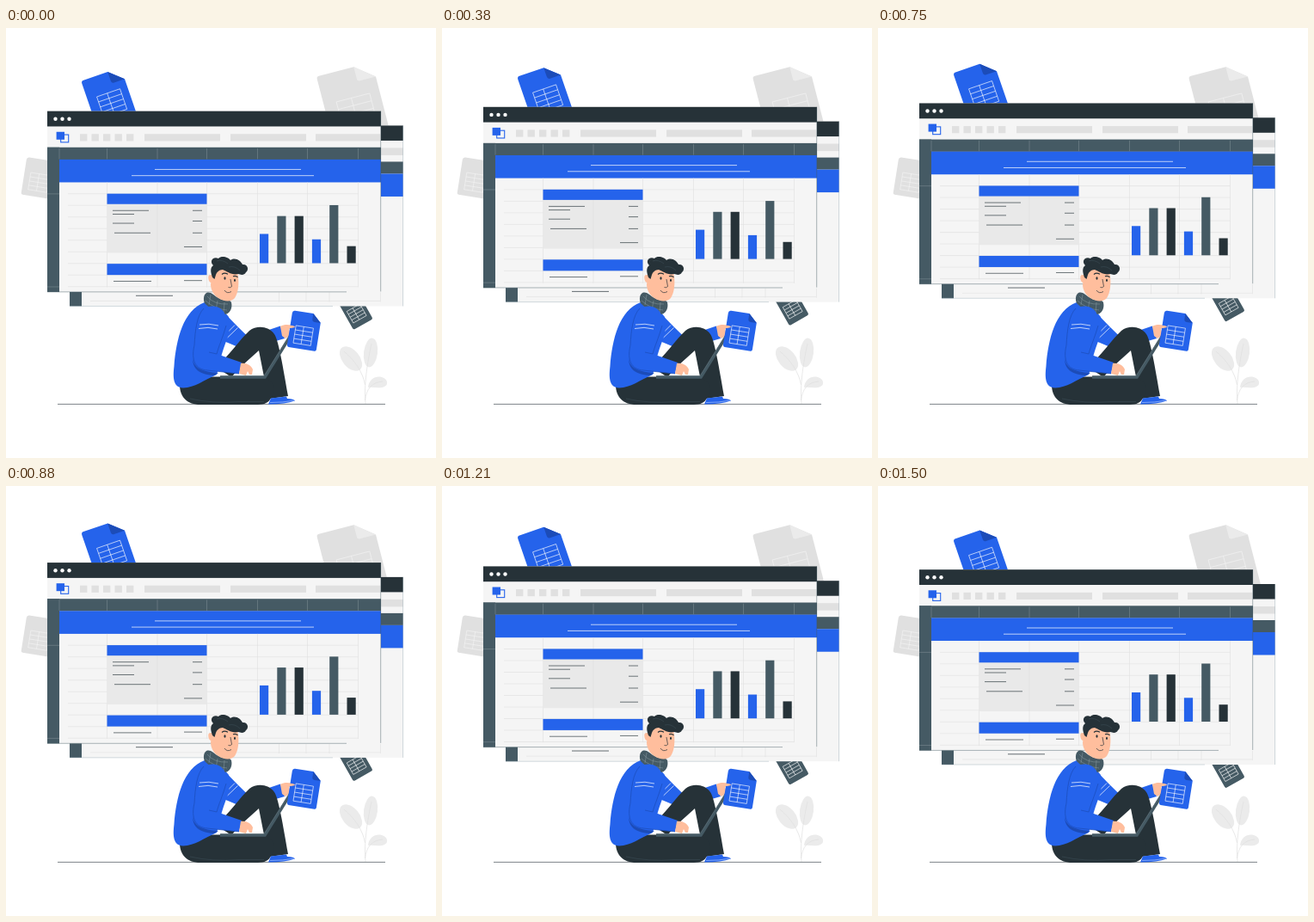
Animation of 500 by 500 pixels, one loop 1540 ms. Source, as an HTML page with a canvas:

```html
<!DOCTYPE html>
<html lang="en">
<head>
<meta charset="utf-8">
<title>Spreadsheets</title>
<style>
html, body { margin: 0; width: 100%; height: 100%; overflow: hidden; background: #fff; }
canvas { display: block; width: 500px; height: 500px; }
</style>
</head>
<body>
<canvas id="stage"></canvas>
<script>
const BLUE = '#2563eb', NAVY = '#1c4cb8', DARK = '#263238', SLATE = '#455a64';
const LIGHT = '#f5f5f5', GREY = '#e0e0e0', PALE = '#ebebeb', SKIN = '#ffbe9d';
const LOOP = 1540, STEPS = 37, LIFT = 10;
const COLUMNS = [117.5, 176, 233.5, 292.5, 350.5, 409.5];

const canvas = document.getElementById('stage');
const ratio = window.devicePixelRatio || 1;
canvas.width = canvas.height = 500 * ratio;
const ctx = canvas.getContext('2d');

function rect(x1, y1, x2, y2, color) {
  ctx.fillStyle = color;
  ctx.fillRect(x1, y1, x2 - x1, y2 - y1);
}
function fill(d, color) {
  ctx.fillStyle = color;
  ctx.fill(new Path2D(d));
}
function stroke(d, color, width = 0.7) {
  ctx.strokeStyle = color;
  ctx.lineWidth = width;
  ctx.stroke(new Path2D(d));
}
function ellipse(x, y, rx, ry, turn, color) {
  ctx.fillStyle = color;
  ctx.beginPath();
  ctx.ellipse(x, y, rx, ry, turn * Math.PI / 180, 0, Math.PI * 2);
  ctx.fill();
}
const hline = (x1, x2, y, color, width) => stroke(`M${x1} ${y}H${x2}`, color, width);
const vline = (x, y1, y2, color, width) => stroke(`M${x} ${y1}V${y2}`, color, width);

// Sheet of paper with a folded corner and a small table.
function sheet({ x, y, turn, w, h, fw, fh, color, fold, table, ink }) {
  ctx.save();
  ctx.translate(x, y);
  ctx.rotate(turn * Math.PI / 180);
  fill(`M3 0H${w - fw}L${w} ${fh}V${h - 2}Q${w} ${h} ${w - 2} ${h}H2Q0 ${h} 0 ${h - 2}V3Q0 0 3 0Z`, color);
  if (fw) fill(`M${w - fw} 0L${w} ${fh}H${w - fw + 3}Q${w - fw} ${fh} ${w - fw} ${fh - 3}Z`, fold);
  const [tx, ty, tw, th] = table;
  for (let i = 0; i <= 4; i++) hline(tx, tx + tw, ty + th * i / 4, ink, 0.6);
  for (const part of [0, 0.45, 1]) vline(tx + tw * part, ty, ty + th, ink, 0.6);
  ctx.restore();
}

const greySheet = { x: 361, y: 56.5, turn: -14.5, w: 66.8, h: 85, fw: 22, fh: 17.3,
  color: GREY, fold: PALE, table: [15, 34.3, 40, 36], ink: LIGHT };
const leftSheet = { x: 24.3, y: 150, turn: 9, w: 40, h: 44, fw: 0, fh: 0,
  color: GREY, table: [7.3, 17.1, 22, 20], ink: LIGHT };
const blueSheet = { x: 87.3, y: 62.2, turn: -19, w: 48.7, h: 62, fw: 16, fh: 14.3,
  color: BLUE, fold: NAVY, table: [11.3, 23.3, 28.5, 25], ink: '#fff' };
const darkSheet = { x: 386.3, y: 320.2, turn: -29.5, w: 26, h: 36, fw: 0, fh: 0,
  color: SLATE, table: [3.8, 13.5, 17.5, 15.5], ink: '#fff' };
const heldSheet = { x: 333.3, y: 328.3, turn: 9, w: 34.4, h: 42.8, fw: 10, fh: 9.5,
  color: BLUE, fold: NAVY, table: [6.6, 16.8, 20.5, 20.5], ink: '#fff' };

function backWindow() {
  rect(74, 114, 461.8, 324, LIGHT);
  rect(74, 114, 461.8, 131.5, DARK);
  rect(430, 140, 461.8, 148.5, GREY);
  rect(74, 156, 461.8, 170, SLATE);
  rect(74, 156, 88, 324, SLATE);
  rect(88, 170, 461.8, 196.5, BLUE);
  hline(98, 435, 318, GREY, 0.6);
  for (const x of [317.5, 349, 376, 435.5]) vline(x, 308, 319, GREY, 0.6);
  hline(151, 194, 311.8, DARK, 0.7);
  vline(461.6, 114, 324, '#90a4ae', 0.4);
  hline(74, 380, 324, '#90a4ae', 0.4);
}

function frontWindow() {
  rect(48, 97.2, 436, 307.5, LIGHT);
  rect(48, 97.2, 436, 115, DARK);
  for (const x of [57.5, 65.5, 73.5]) ellipse(x, 106.3, 2.2, 2.2, 0, '#fff');

  ctx.strokeStyle = BLUE;
  ctx.lineWidth = 1.1;
  ctx.strokeRect(63.7, 124.6, 9, 8.8);
  rect(58.6, 121.3, 68, 130.3, BLUE);
  for (let i = 0; i < 5; i++) rect(86 + i * 13.5, 123.8, 94.4 + i * 13.5, 132, GREY);
  for (const [a, b] of [[161, 249], [261, 349], [360, 435.5]]) rect(a, 123.8, b, 132, GREY);

  rect(48, 139.3, 436, 153.6, SLATE);
  rect(48, 139.3, 62, 307.5, SLATE);
  for (const x of [62, ...COLUMNS]) vline(x, 140.5, 153, '#829299', 0.5);
  for (const y of [193.4, 301.5]) hline(48, 62, y, '#829299', 0.5);
  rect(62, 153.4, 436, 180, BLUE);
  hline(173, 343, 165, '#fff', 0.7);
  hline(146, 358, 172.2, '#fff', 0.7);

  for (let i = 0; i < 9; i++) hline(72, 409.5, 193.3 + i * 13.5, GREY, 0.6);
  for (const x of COLUMNS) vline(x, 180, 302, GREY, 0.6);

  rect(117.5, 205, 233.5, 262, '#e9e9e9');
  vline(176, 205, 262, GREY, 0.6);
  rect(117.5, 193.2, 233.5, 205.3, BLUE);
  rect(117.5, 274.7, 233.5, 287.7, BLUE);
  const entries = [[124, 166, 212.8], [124, 149, 217], [124, 149, 227.6], [126, 168, 238.8],
    [217, 228, 212.8], [217, 228, 225], [217, 228, 238.8], [207, 228, 255],
    [125, 169, 295], [207, 228, 294.2]];
  for (const [a, b, y] of entries) hline(a, b, y, DARK, 0.65);

  [[240, BLUE], [219.2, SLATE], [219.2, DARK], [246.3, BLUE], [206.5, SLATE], [254.2, DARK]]
    .forEach(([top, color], i) => rect(295 + i * 20.3, top, 305.2 + i * 20.3, 274, color));

  vline(435.7, 97.2, 307, SLATE, 0.45);
  hline(48, 396, 307.4, SLATE, 0.45);
}

function plant() {
  ellipse(401, 384.5, 10, 16.5, -40, PALE);
  ellipse(424, 377.5, 8, 17, 7, PALE);
  fill('M421 418C422 408 430 404 437 406C444 408 445 415 440 417C434 420 428 417 421 418Z', PALE);
  stroke('M418 437C416 415 420 390 425 367M417.5 415C415 400 405 386 393 376M417.5 433C419 420 425 412 438 411', GREY, 0.7);
}

function head() {
  fill('M233 308C239 306 242 312 249 315C254 318 260 315 262 319C264 327 259 333 254 333C246 331 238 327 231 320C229 315 230 310 233 308Z', SLATE);
  stroke('M234 312Q242 322 258 321M232 317Q243 327 257 328M238 310L236 322M246 317L244 328M254 319L253 332', '#899aa2', 0.5);
  fill('M241 280C244 275 254 276 262 280L269.5 286C271.5 297 270 308 266 314C262 319 253 318 247 314C242 311 238 305 238 298Z', SKIN);
  ellipse(238.4, 291.5, 3, 4.6, -12, SKIN);
  fill('M240 290C238 284 237 279 241 276C236 271 241 265 247 268C251 264 259 267 261 270C267 266 273 271 275 275C281 274 283 281 279 284C277 288 273 287 270 286C263 288 257 283 252 281C248 281 245 284 244 287L242.5 292Z', DARK);
  stroke('M245 271Q252 269 258 274M259 278Q266 276 272 282', SLATE, 0.4);
  ellipse(254.5, 291, 1.1, 1.7, 0, DARK);
  ellipse(266, 293.3, 1, 1.6, 0, DARK);
  stroke('M251 286.5Q254 284 258 286.3M264 288.8Q267 287.5 269.5 289.8', DARK, 1.2);
  stroke('M261 292L262.5 300.5Q261 302.5 258.5 301.5M254 305Q257 309.5 262 306.5', DARK, 0.7);
}

function legs() {
  fill('M244 394C259 382 272 362 283 352C292 345 306 347 312 356C317 363 322 394 328 428L307 431L299.5 403L294 375L274 393L262 406Z', DARK);
  fill('M202 415C218 402 245 406 270 406L302 407C313 411 314 424 307 432C304 437 298 438 290 438H226C211 438 202 429 202 415Z', DARK);
  stroke('M214 431Q240 437 270 434.5H300', SLATE, 0.4);
  fill('M308 430.5L326 428.5L327 431Q335 431 336 433.5Q325 437.5 305 437.5Z', BLUE);
  stroke('M307 435.5Q322 435.5 335 433.2', '#dbe6ff', 0.5);
}

function farArm() {
  fill('M251 330C260 336 271 350 282 359L319 346.5L324 361L286 372C275 375 264 368 248 362Z', BLUE);
  stroke('M254 357.5L266 345.5M257.5 360L269.5 348.5', '#fff', 0.7);
  fill('M319 347C324 344 331 345 336 347L335 349L329 350L331 357L325 361L321 358Z', SKIN);
}

function body() {
  fill('M231 319C241 321 253 328 259 336C264 354 251 371 249 389L245 403C229 410 220 418 206 418.5C194 418 194 406 195.5 393C198 362 206 328 231 319Z', BLUE);
  fill('M217 384C218 395 228 400 247 401L242 404C227 403 217 398 217 384Z', NAVY);
}

function laptop() {
  stroke('M249 406H301L332 356', SLATE, 3.6);
  stroke('M250 404.6H300L330 357', '#66777f', 0.5);
}

function nearArm() {
  fill('M230 326C244 319 259 327 256 346C252 360 247 371 245 379L274 389L271 402L234 398C220 397 215 386 219 369C220 351 222 334 230 326Z', BLUE);
  stroke('M230 326C222 334 220 351 219 369C215 386 220 397 234 398L271 402M256 346C252 360 247 371 245 379L236 377', NAVY, 0.7);
  stroke('M225 345Q236 343 247 346M224 349.5Q235 347 246 350', '#fff', 0.7);
  fill('M273 390C279 389 285 392 287 397L286 403L283 403L281 399L279 404L271 402Z', SKIN);
}

function person() {
  farArm();
  legs();
  body();
  head();
  laptop();
  nearArm();
  sheet(heldSheet);
  fill('M325 346Q332 345 336 347Q336 349 328 349Z', SKIN);
}

function draw(now) {
  // Linear up and down, played at the loop's stepped rate.
  const step = Math.floor((now % LOOP) / LOOP * STEPS + 0.1) % STEPS;
  const phase = ((step + 1) % STEPS) / STEPS;
  const lift = LIFT * (1 - Math.abs(1 - 2 * phase));

  ctx.setTransform(ratio, 0, 0, ratio, 0, 0);
  rect(0, 0, 500, 500, '#fff');
  sheet(greySheet);
  sheet(leftSheet);

  ctx.save();
  ctx.translate(0, -lift);
  sheet(blueSheet);
  sheet(darkSheet);
  backWindow();
  frontWindow();
  ctx.restore();

  plant();
  hline(60, 441, 437.4, DARK, 0.6);
  person();
}

const start = performance.now();
function tick() {
  draw(performance.now() - start);
  requestAnimationFrame(tick);
}
tick();
</script>
</body>
</html>
```
